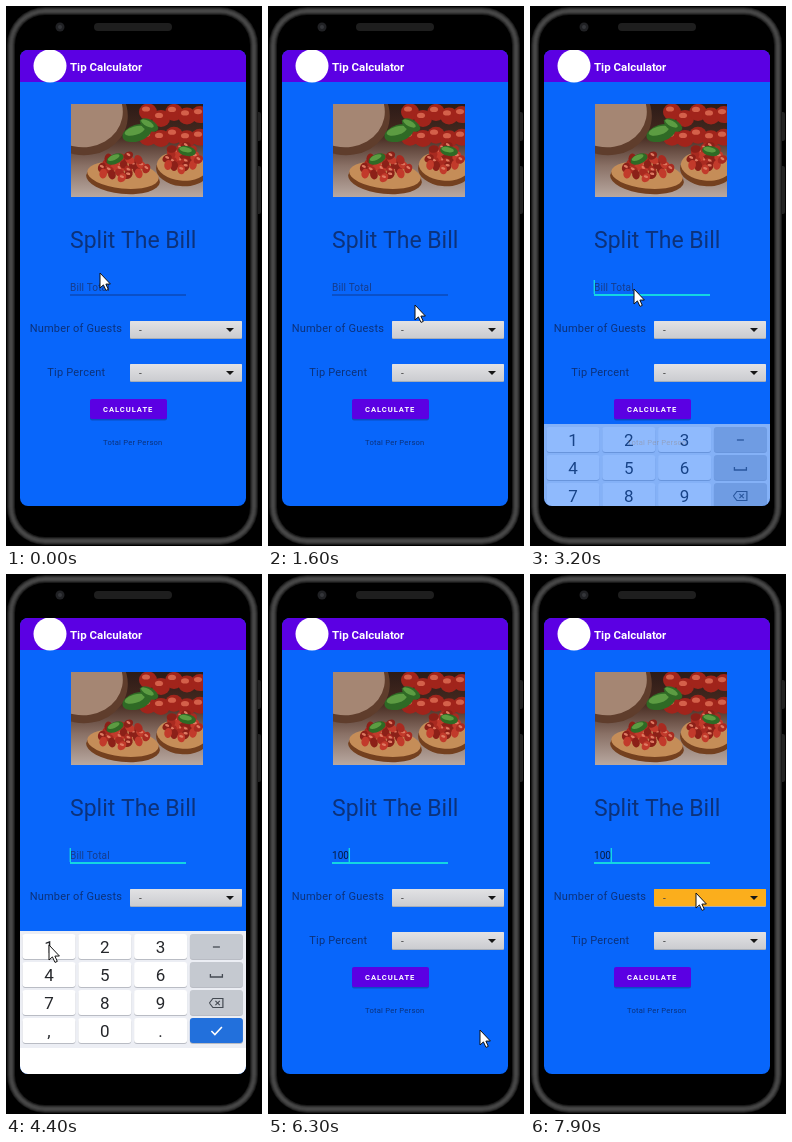
These frames come from a looping animation (256 by 540 pixels, 8000 ms). An HTML page with a canvas:

```html
<!DOCTYPE html>
<html lang="en">
<head>
<meta charset="utf-8">
<title>Tip Calculator</title>
<style>
html, body { margin: 0; width: 100%; height: 100%; overflow: hidden; background: #000; }
canvas { display: block; width: 256px; height: 540px; }
</style>
</head>
<body>
<canvas id="stage"></canvas>
<script>
const LOOP = 8000, STEP = 100;
const FOCUS = 3000, DONE = 5900, PRESS = 7800;
const TYPED = [4500, 5000, 5200];
const FONT = 'Roboto, "Open Sans", sans-serif';
const INK = '#0c327b', GREY = '#444a52', CYAN = '#14d5e2';
const dpr = window.devicePixelRatio || 1;

const layer = canvas => {
  canvas.width = Math.round(256 * dpr);
  canvas.height = Math.round(540 * dpr);
  const ctx = canvas.getContext('2d');
  ctx.scale(dpr, dpr);
  return ctx;
};
const main = layer(document.getElementById('stage'));
let c = main;

const clamp = v => Math.max(0, Math.min(1, v));
const smooth = v => v * v * (3 - 2 * v);
const rand = n => Math.abs(Math.sin(n * 12.9898) * 43758.5453) % 1;

function box(x, y, w, h, r, fill) {
  c.fillStyle = fill;
  c.beginPath();
  c.roundRect(x, y, w, h, r);
  c.fill();
}

function oval(x, y, rx, ry, fill, turn = 0) {
  c.fillStyle = fill;
  c.beginPath();
  c.ellipse(x, y, rx, ry, turn, 0, Math.PI * 2);
  c.fill();
}

function line(points, color, width) {
  c.beginPath();
  points.forEach(([x, y]) => c.lineTo(x, y));
  c.strokeStyle = color;
  c.lineWidth = width;
  c.stroke();
}

function text(s, x, y, size, color, { weight = 400, gap = 0, align = 'left' } = {}) {
  c.font = `${weight} ${size}px ${FONT}`;
  c.letterSpacing = gap + 'px';
  c.textAlign = align;
  c.fillStyle = color;
  c.fillText(s, x, y);
}

function fade(y, h, ...colors) {
  const g = c.createLinearGradient(0, y, 0, y + h);
  colors.forEach((col, i) => g.addColorStop(i / (colors.length - 1), col));
  return g;
}

function phone() {
  box(0, 0, 256, 540, 0, '#000');
  box(250, 106, 5, 29, 2, '#222');
  box(250, 160, 5, 48, 2, '#222');
  // bevelled rim
  for (let i = 0; i < 9; i++) {
    const v = Math.round(72 * Math.sin(Math.PI * (i + 1) / 9));
    box(1 + i, 1 + i, 251 - 2 * i, 538 - 2 * i, 38 - i, `rgb(${v},${v},${v})`);
  }
  box(88, 17, 78, 8, 4, '#1e1e1e');
  oval(54, 21, 4.5, 4.5, '#202124');
  oval(54, 21, 2, 2, '#34363a');
}

function toast(x, y, w, h, seed) {
  oval(x, y + h * .45, w, h, '#74401f', .1);
  oval(x, y + h * .2, w * .97, h * .9, '#c58d58', .1);
  for (let i = 0; i < 24; i++) {
    const a = i * 2.4, r = Math.sqrt(i / 24) * .8;
    const px = x + Math.cos(a) * r * w * .85, py = y - 5 + Math.sin(a) * r * h;
    oval(px, py, 5, 3.8, ['#a92a20', '#c23a2b', '#8c2018'][i % 3], rand(i + seed) * 3);
    if (i % 2) oval(px, py - 1, 2.2, 1.2, '#df7a62', rand(i));
  }
}

function leaf(x, y, r, turn) {
  oval(x, y, r, r * .55, '#2f6a25', turn);
  oval(x - r * .15, y - r * .15, r * .7, r * .28, '#5c9c42', turn);
}

function photo() {
  c.save();
  c.beginPath();
  c.rect(65, 98, 132, 93);
  c.clip();
  box(65, 98, 132, 93, 0, fade(98, 93, '#2c1b17', '#45291f', '#8a7166', '#b8a8a0'));
  oval(76, 108, 46, 41, '#5f3d2c', .2);
  oval(75, 104, 42, 37, '#a58673', .2);
  for (let i = 0; i < 10; i++) {
    const x = 142 + i % 5 * 13, y = 106 + Math.floor(i / 5) * 22 + rand(i) * 7;
    oval(x, y, 9, 8.5, '#a1241b');
    oval(x - 2, y - 3, 4, 2.6, '#d4604a');
  }
  toast(117, 166, 37, 15, 1);
  toast(176, 157, 26, 16, 7);
  leaf(131, 127, 15, -.3);
  leaf(143, 119, 10, .5);
  leaf(109, 153, 9, -.4);
  leaf(181, 145, 9, .2);
  c.restore();
}

function spinner(y, hot) {
  box(124, y, 112, 18, 1, '#a5adb9');
  box(124, y, 112, 17, 1, hot ? '#fbae1c' : fade(y, 17, '#e2e2e4', '#cbccd0'));
  text('-', 133, y + 12.5, 10, '#444');
  c.fillStyle = '#161616';
  c.beginPath();
  [[220, 7], [228, 7], [224, 11]].forEach(([px, py]) => c.lineTo(px, y + py));
  c.fill();
}

function field(t) {
  const focus = t >= FOCUS;
  const value = '100'.slice(0, TYPED.filter(k => t >= k).length);
  if (value) text(value, 64, 285, 10.1, '#071b3f');
  else text('Bill Total', 64, 284.5, 10.1, '#163d8c', { gap: .1 });
  box(64, focus ? 288 : 288.5, 116, focus ? 2 : 1, 0, focus ? CYAN : '#0d3b96');
  if (!focus) return;
  // the caret blink restarts at each input
  const last = [FOCUS, ...TYPED, DONE].filter(k => t >= k).pop();
  if ((t - last) % 1000 < 500) {
    c.letterSpacing = '0px';
    box(63.6 + c.measureText(value).width * (value ? 1 : 0), 274, 1.4, 14, 0, CYAN);
  }
}

function symbol(k, x, y) {
  const at = pts => pts.map(([px, py]) => [x + px, y + py]);
  if (k === '-') line(at([[-3.5, 0], [3.5, 0]]), GREY, 1.3);
  if (k === 's') line(at([[-6, -1], [-6, 2], [6, 2], [6, -1]]), GREY, 1.3);
  if (k === 'v') line(at([[-5, 0], [-1.5, 3.5], [5.5, -4]]), '#fff', 1.6);
  if (k === 'b') {
    line(at([[-7, 0], [-3.5, -4.5], [6.5, -4.5], [6.5, 4.5], [-3.5, 4.5], [-7, 0]]), GREY, 1.2);
    for (const s of [-1, 1]) line(at([[-1, -2.2 * s], [3.4, 2.2 * s]]), GREY, 1.1);
  }
}

function drawKeys() {
  box(14, 357, 226, 143, 0, '#eceef4');
  box(14, 474, 226, 26, 0, '#fff');
  ['123-', '456s', '789b', ',0.v'].forEach((row, j) => [...row].forEach((k, i) => {
    const x = 16.5 + i * 55.8, y = 360 + j * 28, mid = x + 26.5;
    box(x, y + 1, 53, 25, 3, '#b9bcc4');
    box(x, y, 53, 25, 3, k === 'v' ? '#2270dc' : i === 3 ? '#c5c9d0' : '#fff');
    if (i < 3) text(k, mid, y + 19, 17, '#25272b', { align: 'center' });
    else symbol(k, mid, y + 13);
  }));
}

// drawn once on its own layer so that it fades as a whole
const keys = document.createElement('canvas');
c = layer(keys);
drawKeys();
c = main;

function keypad(t) {
  const shown = smooth(clamp((t - FOCUS) / 400)) * (1 - smooth(clamp((t - DONE) / 300)));
  if (!shown) return;
  c.globalAlpha = clamp(shown * 1.1);
  c.drawImage(keys, 0, 122 * (1 - shown), 256, 540);
  c.globalAlpha = 1;
}

// pointer moves: start, end, x, y of the goal
const START = [94, 267];
const MOVES = [
  [0, 1600, 147, 299], [2200, 2900, 104, 283], [3500, 4300, 43, 371],
  [4600, 5000, 96, 456], [5300, 5700, 186, 474], [5700, 6000, 212, 456],
  [6700, 7700, 166, 319]
];

function pointer(t) {
  let [x, y] = START;
  for (const [from, to, gx, gy] of MOVES) {
    const k = smooth(clamp((t - from) / (to - from)));
    x += (gx - x) * k;
    y += (gy - y) * k;
  }
  c.beginPath();
  [[0, 0], [0, 15], [3.4, 11.9], [6, 17.4], [8.3, 16.4], [5.9, 11.1], [10.4, 11]]
    .forEach(([px, py]) => c.lineTo(x + px, y + py));
  c.closePath();
  c.fillStyle = '#fff';
  c.fill();
  c.strokeStyle = '#111';
  c.lineWidth = 1;
  c.stroke();
}

function draw(t) {
  phone();
  c.save();
  c.beginPath();
  c.roundRect(14, 44, 226, 456, 8);
  c.clip();
  box(14, 44, 226, 456, 0, '#0866fb');
  box(14, 44, 226, 32, 0, '#5b00e3');
  oval(44, 60, 16.5, 16.5, '#fff');
  text('Tip Calculator', 64, 64.5, 11.5, '#fff', { weight: 700 });
  photo();
  text('Split The Bill', 64, 242, 23, INK);
  field(t);
  text('Number of Guests', 23.7, 326, 11, INK, { gap: .2 });
  text('Tip Percent', 41.3, 369.7, 11, INK, { gap: .2 });
  spinner(315, t >= PRESS);
  spinner(358, false);
  box(84, 394, 77, 20.5, 2, '#0a4cc4');
  box(84, 393, 77, 20, 2, '#5b00e3');
  text('CALCULATE', 97, 406, 7.6, '#fff', { weight: 700, gap: .95 });
  text('Total Per Person', 97, 439, 7.6, INK, { gap: .23 });
  keypad(t);
  c.restore();
  pointer(t);
}

function tick(now) {
  draw(Math.floor((now % LOOP) / STEP) * STEP);
  requestAnimationFrame(tick);
}
requestAnimationFrame(tick);
</script>
</body>
</html>
```
